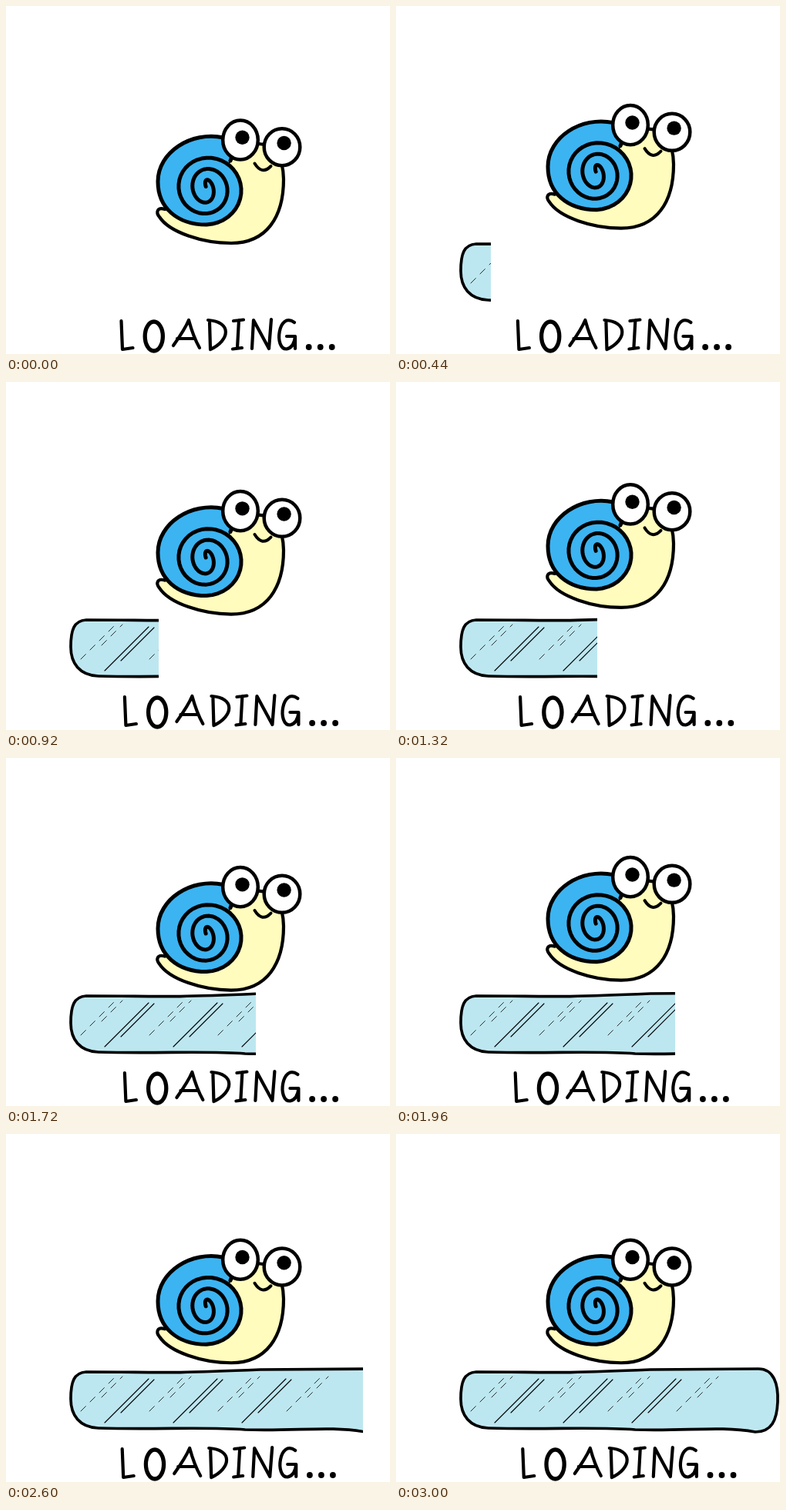
Animation of 498x452 px, one loop 3.04 s. Source, as an HTML page:

```html
<!DOCTYPE html>
<html lang="en">
<head>
<meta charset="utf-8">
<title>Loading</title>
<style>
  html, body { margin: 0; width: 100%; height: 100%; overflow: hidden; background: #fff; }
  svg { display: block; }
  path, ellipse { stroke: #000; stroke-linecap: round; stroke-linejoin: round; }
</style>
</head>
<body>
<svg width="498" height="452" viewBox="0 0 498 452">
  <clipPath id="reveal"><rect id="edge" x="0" y="290" width="0" height="110"/></clipPath>
  <g id="bar" clip-path="url(#reveal)"></g>
  <g id="snail"></g>
  <g id="label" role="img" aria-label="LOADING..."></g>
</svg>
<script>
const $ = id => document.getElementById(id);
const bar = $('bar'), snail = $('snail'), label = $('label'), edge = $('edge');

function add(parent, tag, attrs) {
  const el = document.createElementNS('http://www.w3.org/2000/svg', tag);
  for (const k in attrs) el.setAttribute(k, attrs[k]);
  parent.append(el);
}

function stroke(parent, d, width, fill = 'none', dash = 'none') {
  add(parent, 'path', { d, fill, 'stroke-width': width, 'stroke-dasharray': dash });
}

function oval(parent, cx, cy, rx, ry, width, fill = 'none') {
  add(parent, 'ellipse', { cx, cy, rx, ry, fill, 'stroke-width': width });
}

function dot(parent, cx, cy, r) {
  add(parent, 'circle', { cx, cy, r });
}

// Progress bar with repeating glass reflections
stroke(bar, `M104,309C200,309 190,312 330,306L470,305C490,305 496,325 495,348
  C494,372 487,387 466,387C420,379 380,386 310,384C260,380 200,384 120,382
  C95,381 84,365 84,344C84,322 88,310 104,309Z`, 3.7, '#bde7f0');
for (let i = 0; i < 4; i++) {
  const x = 97 + 89 * i;
  stroke(bar, `M${x},360l43,-43M${x + 27},342l27,-27`, 0.8, 'none', '9 8');
  if (i < 3) stroke(bar, `M${x + 31},375l57,-57M${x + 52},362l43,-43`, 1.1);
}

// Snail body
stroke(snail, `M206,264C196,261 194,268 199,274C212,294 255,308 292,308
  C338,308 360,274 360,225Q359,180 328,179Q300,182 294,196L260,240Z`, 4.2, '#fffcbd');

// Shell: an outer arc running into a spiral, u counted in half turns
let shell = 'M291,201L297,186L282,171C240,162 197,190 197,228C197,262 222,284 260,284';
for (let u = 0; u <= 5.4; u += 0.05) {
  const x = 260 + (49.5 - 9 * u) * Math.sin(Math.PI * u);
  const y = 237 + (47 - 7.2 * u) * Math.cos(Math.PI * u);
  shell += `L${x.toFixed(2)},${y.toFixed(2)}`;
}
stroke(snail, shell, 5, '#3cb4f2');

// Face
oval(snail, 304, 174, 22.8, 25.6, 4.5, '#fff');
oval(snail, 358, 183.2, 23.3, 24, 4.5, '#fff');
dot(snail, 306.5, 170.8, 9.2);
dot(snail, 360.6, 178, 9.2);
stroke(snail, 'M322.5,204.5Q332,220 343.5,208', 4);

// Hand-lettered caption
oval(label, 191.8, 429, 11.6, 19, 5.3);
stroke(label, `M149.5,409L151,446L164.5,444
  M217,441Q232,420 237,408Q243,430 251,444M222,432H243
  M264,410L265,445M262,408C293,410 291,434 265,446
  M295,409L308,407.5M302,408L300,444M294,445.5L306,444
  M319,445L321,408L341,445L344,407
  M374,411C353,396 347,446 364,445.5Q374,443 375,429H364M375,429V445`, 4.2);
for (let i = 0; i < 3; i++) dot(label, 392.7 + 15 * i, 443, 3.9);

const LOOP = 3040, STEP = 40, SWING = 800;

// 0 -> 1 -> 0 at constant speed, resting at 0 before it starts
function swing(t) {
  if (t < 0) return 0;
  const u = t % SWING / SWING;
  return 1 - Math.abs(1 - 2 * u);
}

const start = performance.now();
function draw(now) {
  const t = Math.floor(Math.max(0, now - start) % LOOP / STEP) * STEP;
  edge.setAttribute('width', Math.round(53.5 + 0.1575 * t));
  snail.setAttribute('transform', `translate(0 ${-21.5 * swing(t)})`);
  label.setAttribute('transform', `translate(${16 * swing(t - 230)} 0)`);
  requestAnimationFrame(draw);
}
draw(start);
</script>
</body>
</html>
```
